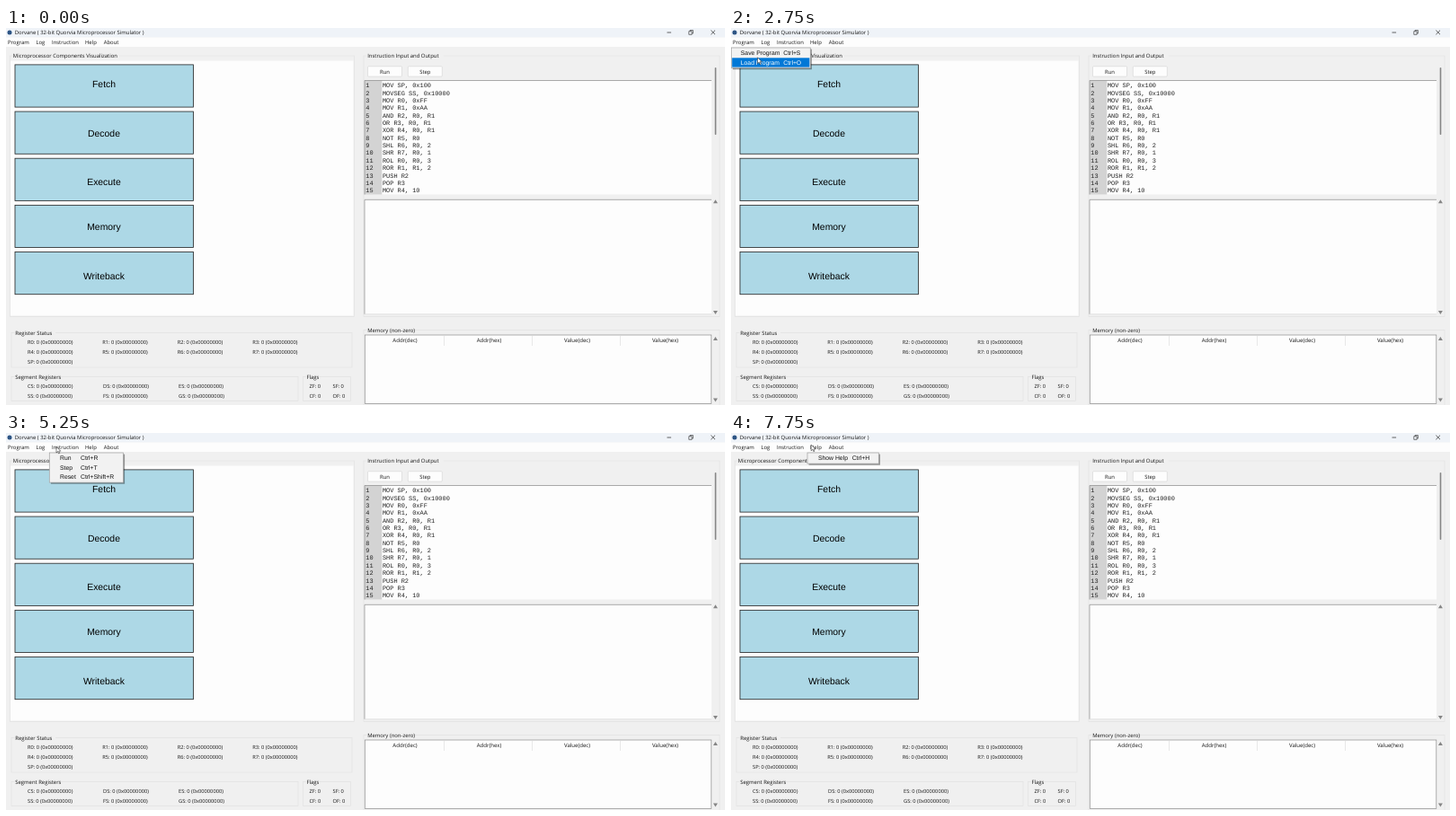
Recreate the animation shown at these times as an HTML page. Size 800 by 420 pixels, loop 8000 ms.

```html
<!DOCTYPE html>
<html lang="en">
<head>
<meta charset="utf-8">
<title>Microprocessor Simulator</title>
<style>
  html, body { margin: 0; width: 100%; height: 100%; overflow: hidden; background: #f0f0f0; }
  svg { display: block; width: 800px; height: 420px; }
  text { font: 5.93px "Open Sans", "Noto Sans", sans-serif; fill: #151515; text-rendering: geometricPrecision; white-space: pre; }
  .reg { font-size: 5.73px; }
  .head { font-size: 6.05px; }
  .code { font: 6.95px "Liberation Mono", monospace; fill: #222; }
  .stage { font: 10.42px "Liberation Sans", Arial, sans-serif; fill: #000; }
  .item { font: 6.82px "Liberation Sans", Arial, sans-serif; fill: #111; }
  .item.on { fill: #fff; }
</style>
</head>
<body>
<svg id="stage" viewBox="0 0 800 420"></svg>
<script>
const svg = document.getElementById('stage');

function add(parent, tag, attrs, content) {
  const el = document.createElementNS('http://www.w3.org/2000/svg', tag);
  for (const key in attrs) el.setAttribute(key, attrs[key]);
  if (content !== undefined) el.textContent = content;
  parent.appendChild(el);
  return el;
}
const rect = (x, y, width, height, fill, more) =>
  add(svg, 'rect', { x, y, width, height, fill, ...more });
const path = (d, stroke, fill = 'none', width = 0.7) =>
  add(svg, 'path', { d, stroke, fill, 'stroke-width': width });
const label = (x, y, content, cls = '', more) =>
  add(svg, 'text', { x, y, class: cls, ...more }, content);
const middle = { 'text-anchor': 'middle' };

function group(x, y, w, h, title, titleX, baseline) {
  rect(x, y, w, h, 'none', { stroke: '#e2e2e2', 'stroke-width': 0.7 });
  rect(titleX - 1, y - 2, title.length * 3.05, 4, '#f0f0f0');
  label(titleX, baseline, title);
}
function arrows(x, top, bottom) {
  path(`M${x - 2.5} ${top + 2}h5l-2.5 -4z`, 'none', '#858585');
  path(`M${x - 2.5} ${bottom - 2}h5l-2.5 4z`, 'none', '#858585');
}

function drawWindow() {
  rect(0, 0, 800, 420, '#f0f0f0');
  rect(0, 0, 800, 10.5, '#eff3f8');
  rect(0, 10.5, 800, 10.5, '#fdfdfd');
  add(svg, 'circle', { cx: 4, cy: 5, r: 2.5, fill: '#2c5484' });
  label(9.8, 7.1, 'Dorvane ( 32-bit Quorvia Microprocessor Simulator )');
  path('M735.5 5h4.6', '#222');
  path('M759.8 3.7h3.3v3.6h-3.3zM761 3.6v-1.1h3.4v3.6h-1.2', '#222', 'none', 0.6);
  path('M784.4 2.6l4.6 4.6m0 -4.6l-4.6 4.6', '#222');
  [[2, 'Program'], [33.4, 'Log'], [51, 'Instruction'], [88, 'Help'], [108.7, 'About']]
    .forEach(([x, name]) => label(x, 18.2, name));
}

function drawLeft() {
  group(4.5, 31, 383, 290.5, 'Microprocessor Components Visualization', 7.8, 33);
  rect(5, 36.5, 381.5, 284, '#fdfdfd');
  const baselines = [65.6, 120.6, 175.4, 225, 279.6];
  ['Fetch', 'Decode', 'Execute', 'Memory', 'Writeback'].forEach((name, i) => {
    rect(10, 40.9 + i * 52.15, 198.5, 47.2, '#add8e6', { stroke: '#222', 'stroke-width': 0.8 });
    label(109, baselines[i], name, 'stage', middle);
  });

  const zero = name => `${name}: 0 (0x00000000)`;
  group(6, 339.5, 379, 38.5, 'Register Status', 10.3, 341.6);
  for (let i = 0; i < 8; i++)
    label([24, 107.3, 190.8, 274.2][i % 4], i < 4 ? 352.2 : 362.8, zero('R' + i), 'reg');
  label(24, 373.7, zero('SP'), 'reg');

  group(6, 388.5, 319, 27, 'Segment Registers', 10.3, 390.5);
  ['CS', 'DS', 'ES', 'SS', 'FS', 'GS'].forEach((name, i) =>
    label([24, 108, 192][i % 3], i < 3 ? 401.3 : 411.9, zero(name), 'reg'));

  group(330.5, 388.5, 53, 27, 'Flags', 334.5, 390.5);
  ['ZF', 'SF', 'CF', 'OF'].forEach((name, i) =>
    label([337.5, 363.5][i % 2], i < 2 ? 401.3 : 411.9, name + ': 0', 'reg'));
}

function drawRight() {
  group(398, 31, 396, 290.5, 'Instruction Input and Output', 402.2, 33);
  [[402.5, 'Run'], [447.3, 'Step']].forEach(([x, name]) => {
    rect(x, 42.7, 38, 11.4, '#fdfdfd', { rx: 1, stroke: '#d2d2d2', 'stroke-width': 0.6 });
    label(x + 19, 50.5, name, '', middle);
  });

  rect(399, 58.5, 386, 127, '#fdfdfd');
  rect(399, 58.5, 19.3, 127, '#d3d3d3');
  path('M399 185.5V58.5H785', '#888');
  const code = ['MOV SP, 0x100', 'MOVSEG SS, 0x10000', 'MOV R0, 0xFF', 'MOV R1, 0xAA',
    'AND R2, R0, R1', 'OR R3, R0, R1', 'XOR R4, R0, R1', 'NOT R5, R0', 'SHL R6, R0, 2',
    'SHR R7, R0, 1', 'ROL R0, R0, 3', 'ROR R1, R1, 2', 'PUSH R2', 'POP R3', 'MOV R4, 10'];
  code.forEach((line, i) => {
    const y = 66.2 + i * 8.36;
    label(400.3, y, i + 1, 'code');
    label(418.9, y, line, 'code');
  });
  rect(788.7, 44, 1.6, 75, '#858585', { rx: 0.8 });

  rect(399, 191.3, 386, 127.5, '#fdfdfd');
  path('M399 318.8V191.3H785', '#888');
  path('M399 318.8H785', '#d8d8d8');
  arrows(789.4, 193.3, 317);

  group(398, 336.5, 396, 88, 'Memory (non-zero)', 402.2, 338.6);
  rect(399.3, 342, 385.5, 76.5, '#fdfdfd', { stroke: '#8c8c8c', 'stroke-width': 0.7 });
  path('M487.5 343v11M585.5 343v11M683.5 343v11', '#dedede');
  ['Addr(dec)', 'Addr(hex)', 'Value(dec)', 'Value(hex)'].forEach((name, i) =>
    label([444, 537.5, 635.5, 733.5][i], 350.2, name, 'head', middle));
  arrows(789.4, 346, 414.5);
}

function makeMenu(x, width, textX, keyX, items) {
  const y = 22, height = items.length * 10.5 + 1.6;
  const g = add(svg, 'g', { opacity: 0 });
  add(g, 'rect', { x: x + 1.6, y: y + 1.6, width, height, fill: '#000', opacity: 0.4 });
  add(g, 'rect', { x, y, width, height, fill: '#f2f2f2', stroke: '#a0a0a0', 'stroke-width': 0.7 });
  const bar = add(g, 'rect', { x: x + 0.9, width: width - 1.8, height: 10.3, fill: '#0078d7' });
  const rows = items.map(([name, key], i) => [[textX, name], [keyX, key]].map(([tx, s]) =>
    add(g, 'text', { x: tx, y: 30.3 + i * 10.5, class: 'item' }, s)));
  return (opacity, row) => {
    g.setAttribute('opacity', opacity);
    bar.setAttribute('y', 22.8 + row * 10.5);
    bar.setAttribute('visibility', row < 0 ? 'hidden' : 'inherit');
    rows.forEach((cells, i) => cells.forEach(c => c.classList.toggle('on', i === row)));
  };
}

drawWindow();
drawLeft();
drawRight();

const menus = {
  program: makeMenu(0.3, 88, 10.8, 58.3, [['Save Program', 'Ctrl+S'], ['Load Program', 'Ctrl+O']]),
  log: makeMenu(30.3, 122.5, 42, 106, [['Open processor.log', 'Ctrl+L'], ['Clear processor.log', 'Ctrl+Shift+L']]),
  run: makeMenu(48.3, 82.2, 60, 83, [['Run', 'Ctrl+R'], ['Step', 'Ctrl+T'], ['Reset', 'Ctrl+Shift+R']]),
  help: makeMenu(85, 79.3, 97, 134.7, [['Show Help', 'Ctrl+H']])
};
const pointer = add(svg, 'path', {
  d: 'M0 0V6.8L1.6 5.3L2.7 7.7L3.7 7.2L2.7 4.9H4.8Z',
  fill: '#fff', stroke: '#111', 'stroke-width': 0.5
});

// time, menu, opacity, highlighted row
const menuSteps = [
  [0, '', 0, -1],
  [1250, 'program', 0.5, -1], [1375, 'program', 1, -1], [1750, 'program', 1, 0], [2375, 'program', 1, 1],
  [3125, 'program', 1, -1], [3250, 'log', 0.5, -1], [3375, 'log', 1, -1], [3750, 'log', 1, 0], [4125, 'log', 1, 1],
  [4875, 'log', 1, -1], [5125, 'run', 0.5, -1], [5250, 'run', 1, -1], [5875, 'run', 1, 0], [6750, 'run', 1, 1],
  [7250, 'run', 1, 2], [7500, 'run', 1, -1], [7625, 'help', 0.5, -1], [7750, 'help', 1, -1]
];
// time, x, y
const pointerSteps = [
  [0, 804, 430], [125, 735, 404], [375, 11, 12.5], [1125, 11, 12.5], [1250, 12.3, 13],
  [1500, 16, 18], [2000, 25, 25], [2125, 25.5, 26], [2750, 29.5, 32.8], [2875, 30, 33.5],
  [3250, 36, 14], [3500, 37, 15], [3750, 39, 24], [4250, 43, 34.3], [4625, 44, 36],
  [4750, 45, 32], [5125, 56, 15], [5625, 56, 16], [5875, 56.5, 24], [6130, 57.5, 31],
  [6500, 60, 31.5], [6750, 64, 34.5], [7125, 68.2, 34.2], [7375, 74, 44], [7625, 87, 16], [7750, 89.2, 13], [8000, 89.2, 13]
];

const LOOP = 8000, TICK = 125;

function render(ms) {
  const t = Math.floor((ms % LOOP) / TICK) * TICK;
  const [, open, opacity, row] = menuSteps.filter(s => s[0] <= t).pop();
  for (const name in menus) menus[name](name === open ? opacity : 0, name === open ? row : -1);

  const next = pointerSteps.findIndex(s => s[0] > t);
  const [t0, x0, y0] = pointerSteps[next - 1];
  const [t1, x1, y1] = pointerSteps[next];
  const k = (t - t0) / (t1 - t0);
  pointer.setAttribute('transform', `translate(${x0 + (x1 - x0) * k} ${y0 + (y1 - y0) * k})`);
}

const start = performance.now();
function frame() {
  render(Math.max(0, performance.now() - start));
  requestAnimationFrame(frame);
}
frame();
</script>
</body>
</html>
```
